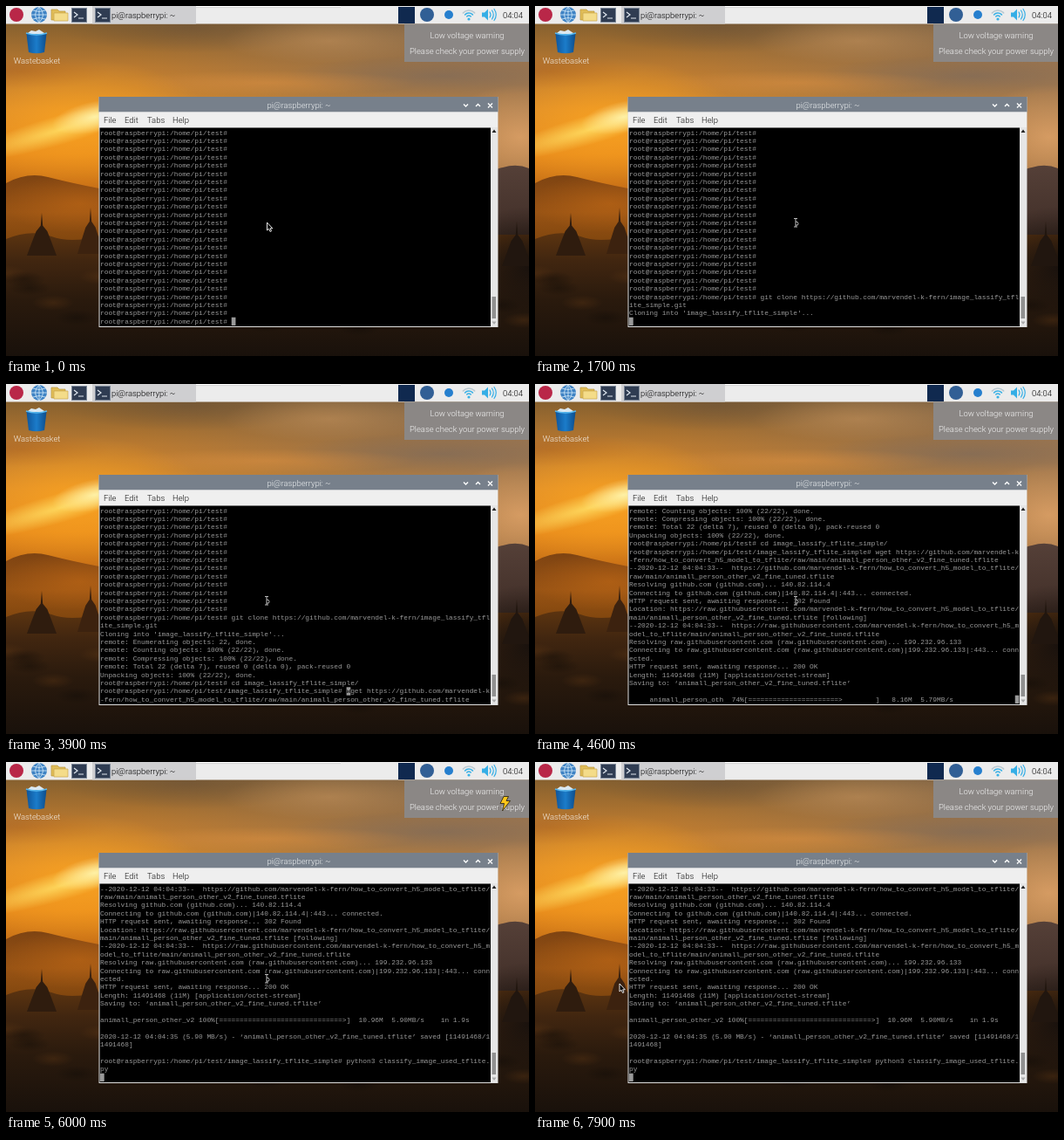
An HTML page with a canvas for the animation above (8 s loop, 600 px wide and 401 px high).

```html
<!DOCTYPE html>
<html lang="en">
<head>
<meta charset="utf-8">
<title>Terminal session</title>
<style>
html, body { margin: 0; width: 100%; height: 100%; overflow: hidden; background: #17120d; }
canvas { display: block; }
</style>
</head>
<body>
<canvas id="stage" width="600" height="401"></canvas>
<script>
const LOOP = 8000, COLS = 95, ROWS = 24;
const CELL = 4.71, ROW = 9.4, TERM_X = 108, TERM_Y = 140.5;
const UI = '300 9.45px Roboto, "Open Sans", sans-serif';
const MONO = '7.85px "Liberation Mono", monospace';
const INK = '#999';
const stage = document.getElementById('stage');
let c = stage.getContext('2d');

// ---------- drawing helpers ----------
function rect(x, y, w, h, fill) {
  c.fillStyle = fill;
  c.fillRect(x, y, w, h);
}
function disc(x, y, r, fill, ry = r) {
  c.fillStyle = fill;
  c.beginPath();
  c.ellipse(x, y, r, ry, 0, 0, 7);
  c.fill();
}
function shape(d, fill, stroke, width = 1) {
  const p = new Path2D(d);
  if (fill) { c.fillStyle = fill; c.fill(p); }
  if (stroke) { c.strokeStyle = stroke; c.lineWidth = width; c.stroke(p); }
}
function label(s, x, y, fill, align = 'left') {
  c.font = UI;
  c.textAlign = align;
  c.fillStyle = fill;
  c.fillText(s, x, y);
}
function at(x, y, draw) {
  c.save();
  c.translate(x, y);
  draw();
  c.restore();
}
function ramp(x0, y0, x1, y1, stops) {
  const g = c.createLinearGradient(x0, y0, x1, y1);
  stops.forEach(([p, col]) => g.addColorStop(p, col));
  return g;
}
// Soft elliptical patch; rgb is "r,g,b"
function glow(x, y, rx, ry, rgb, alpha, turn = 0) {
  at(x, y, () => {
    c.rotate(turn);
    c.scale(rx, ry);
    const g = c.createRadialGradient(0, 0, 0, 0, 0, 1);
    g.addColorStop(0, `rgba(${rgb},${alpha})`);
    g.addColorStop(.5, `rgba(${rgb},${alpha * .5})`);
    g.addColorStop(1, `rgba(${rgb},0)`);
    rect(-1, -1, 2, 2, g);
  });
}

// ---------- desktop ----------
function stupa(x, top, base, half, fill) {
  const h = base - top;
  shape(`M${x} ${top}l1.2 ${h * .3}l${half * .3} ${h * .13}l${half * .25} ${h * .22}L${x + half} ${base}
    H${x - half}L${x - half * .55 - 1.2} ${top + h * .65}l${half * .25} ${-h * .22}l${half * .3} ${-h * .13}Z`, fill);
}
function wallpaper() {
  rect(0, 0, 600, 401, ramp(0, 20, 0, 270, [
    [0, '#86602f'], [.2, '#b97930'], [.4, '#db8c2c'], [.6, '#e4881d'], [.75, '#c67016'], [1, '#8c4c18']]));
  rect(0, 0, 600, 401, ramp(150, 0, 600, 0, [
    [0, 'rgba(130,108,88,0)'], [.6, 'rgba(134,110,88,.5)'], [1, 'rgba(146,116,90,.72)']]));
  glow(210, 24, 150, 30, '108,82,54', .65);
  glow(370, 40, 120, 26, '196,146,92', .55);
  glow(500, 80, 180, 24, '120,104,92', .6);
  glow(300, 88, 170, 14, '220,144,66', .5);
  glow(20, 75, 100, 20, '172,100,34', .6);
  glow(590, 150, 90, 60, '228,166,106', .75);
  glow(85, 135, 150, 75, '255,166,30', .8);
  glow(62, 142, 115, 17, '255,222,100', .85, -.28);
  glow(102, 127, 50, 18, '255,243,170', .95, -.2);
  shape('M0 203Q24 190 48 196Q80 204 107 209L300 230V300H0Z',
    ramp(0, 192, 0, 290, [[0, '#7d4312'], [.45, '#985314'], [.75, '#84480f'], [1, '#59320f']]));
  shape('M480 240Q550 188 570 185Q586 180 600 186V310H480Z',
    ramp(0, 182, 0, 300, [[0, '#554038'], [.5, '#46332c'], [1, '#2a1c15']]));
  glow(85, 226, 90, 34, '214,116,22', .4);
  shape('M0 267Q28 255 52 264T112 262L600 262V401H0Z',
    ramp(0, 255, 0, 401, [[0, '#603610'], [.25, '#412610'], [.55, '#2a1a0d'], [1, '#19110b']]));
  glow(600, 300, 90, 70, '22,16,13', .9);
  stupa(41, 237, 286, 17, '#2f1c0e');
  stupa(97, 231, 284, 15, '#3c220f');
  stupa(586, 247, 298, 17, '#21160f');
  for (let i = 0; i < 24; i++) {
    const x = i * 27 % 600;
    glow(x, 306 + i * 17 % 64, 24, 9, i % 2 ? '14,10,6' : '92,54,20', .4);
  }
}
function terminalIcon(x) {
  rect(x, 2, 18, 17, '#7c8797');
  rect(x + 1, 3, 16, 15, '#2f3c52');
  shape(`M${x + 3} 7l4 3l-4 3M${x + 8} 14h6`, null, '#dfe6ee', 1.2);
}
function panel() {
  rect(0, 0, 600, 20.5, '#ececec');
  rect(99, 0, 119, 20.5, '#cfcfd1');
  rect(218, 0, 166, 1.5, '#fff');
  rect(218, 1.5, 166, .6, '#b9b9b9');
  disc(12, 10, 8, '#b92748');
  disc(38, 10, 9, '#3f83c4');
  shape('M29 10H47M38 1V19M31 5Q38 8 45 5M31 15Q38 12 45 15M38 1Q29 10 38 19Q47 10 38 1', null, '#c8e2f5', .9);
  shape('M52 4h7l2 2h7v10H52Z', '#e0bd58', '#b9963a', .7);
  shape('M55 8h16v9H55Z', '#f4dc89', '#c9a54b', .7);
  terminalIcon(75);
  terminalIcon(102);
  label('pi@raspberrypi: ~', 121, 13.6, '#000');
  rect(450, 1, 19, 19, '#10294f');
  disc(483, 10, 8, '#315f95');
  disc(508, 10, 5, '#267fce');
  c.lineCap = 'round';
  [[9, '#b9c8d0'], [6, '#3ab1e6'], [3, '#3ab1e6']].forEach(([r, col]) => {
    c.beginPath();
    c.arc(531, 14, r, -2.4, -.74);
    c.strokeStyle = col;
    c.lineWidth = 1.6;
    c.stroke();
  });
  disc(531, 15, 1.6, '#3ab1e6');
  shape('M546 7.5h3l4-4v13l-4-4h-3Z', '#35aee6');
  shape('M555 7q2 3 0 6M557.5 5q3.5 5 0 10M560 3.5q4.5 6.5 0 13', null, '#35aee6', 1.2);
  c.lineCap = 'butt';
  label('04:04', 570, 13.6, '#000');
}
function wastebasket() {
  shape('M25 31l4-3l5 1l4-2l6 4v4H25Z', '#dbe8f1');
  shape('M23.5 32H46.5L44 53Q35 55.5 26 53Z', ramp(24, 0, 46, 0, [[0, '#0f569c'], [.5, '#1b7cca'], [1, '#0e4f8e']]));
  shape('M23 31Q35 35 47 31', null, '#58b8ee', 1.6);
  label('Wastebasket', 35.5, 66, '#f3eee6', 'center');
}
function notice() {
  rect(457, 20.5, 143, 43.5, 'rgba(139,137,136,.96)');
  label('Low voltage warning', 529, 36.5, '#f4f4f4', 'center');
  label('Please check your power supply', 529, 55.3, '#f4f4f4', 'center');
}
function windowFrame() {
  rect(106.5, 104, 458, 264, '#dedede');
  rect(106.5, 104, 458, 17.5, '#77808b');
  label('pi@raspberrypi: ~', 336, 117, '#eceef0', 'center');
  shape('M525 112.5l2.5 2.5l2.5-2.5M539 115l2.5-2.5l2.5 2.5M553 111.5l5 5M558 111.5l-5 5', null, '#fff', 1.4);
  rect(107, 121.5, 457, 18, '#efefef');
  [['File', 112], ['Edit', 136], ['Tabs', 162], ['Help', 191]].forEach(([s, x]) => label(s, x, 134, '#111'));
  rect(107.5, 139.5, 448.5, 227.5, '#000');
  rect(556, 139.5, 8, 227.5, '#e6e6e6');
  rect(557.5, 333, 4.5, 25, '#919191');
  shape('M557.5 145h5l-2.5-3.5Z', '#222');
  shape('M557.5 361.5h5l-2.5 3.5Z', '#a8a8a8');
}

// ---------- terminal session ----------
const HOME = 'root@raspberrypi:/home/pi/test# ';
const REPO = 'root@raspberrypi:/home/pi/test/image_lassify_tflite_simple# ';
const USER = 'marvendel-k-fern';
const PROJECT = USER + '/how_to_convert_h5_model_to_tflite/';
const FILE = 'animall_person_other_v2_fine_tuned.tflite';
const PAGE = `https://github.com/${PROJECT}raw/main/${FILE}`;
const RAW = `https://raw.githubusercontent.com/${PROJECT}main/${FILE}`;
const GET_START = 4300, GET_END = 4700;

function progress(t) {
  const p = Math.min(1, .74 * (t - GET_START) / (4600 - GET_START));
  if (t >= GET_END) {
    return `animall_person_other_v2 100%[${'='.repeat(30)}>]  10.96M  5.90MB/s    in 1.9s`;
  }
  const fill = Math.round(31 * p);
  const bar = fill ? '='.repeat(fill - 1) + '>' : '';
  const size = (p === .74 ? 8.16 : 10.96 * p).toFixed(2) + 'M';
  const percent = (Math.floor(p * 100 + .01) + '%').padStart(5);
  return `     animall_person_oth${percent}[${bar.padEnd(31)}]${size.padStart(8)}  5.79MB/s`.padEnd(COLS - 1);
}

// Each step adds its text to the log from its time on
const session = [
  [0, (HOME + '\n').repeat(ROWS - 1) + HOME],
  [700, `git clone https://github.com/${USER}/image_lassify_tflite_simple.git`],
  [1300, "\nCloning into 'image_lassify_tflite_simple'...\n"],
  [1900, 'remote: Enumerating objects: 22, done.\nremote: Counting objects: 100% (22/22), done.\n'
    + 'remote: Compressing objects: 100% (22/22), done.\n'],
  [2000, 'remote: Total 22 (delta 7), reused 0 (delta 0), pack-reused 0\n'
    + 'Unpacking objects: 100% (22/22), done.\n' + HOME],
  [2300, 'cd '],
  [2400, 'im'],
  [2500, 'age_lassify_tflite_simple/'],
  [3000, '\n' + REPO],
  [3500, 'wget ' + PAGE],
  [4100, `\n--2020-12-12 04:04:33--  ${PAGE}\nResolving github.com (github.com)... 140.82.114.4\n`
    + 'Connecting to github.com (github.com)|140.82.114.4|:443... connected.\n'],
  [4200, `HTTP request sent, awaiting response... 302 Found\nLocation: ${RAW} [following]\n`
    + `--2020-12-12 04:04:33--  ${RAW}\n`
    + 'Resolving raw.githubusercontent.com (raw.githubusercontent.com)... 199.232.96.133\n'
    + 'Connecting to raw.githubusercontent.com (raw.githubusercontent.com)|199.232.96.133|:443... connected.\n'],
  [GET_START, 'HTTP request sent, awaiting response... 200 OK\n'
    + `Length: 11491468 (11M) [application/octet-stream]\nSaving to: ‘${FILE}’\n\n`],
  [GET_START, progress],
  [GET_END, `\n\n2020-12-12 04:04:35 (5.90 MB/s) - ‘${FILE}’ saved [11491468/11491468]\n\n${REPO}`],
  [5200, 'python3 '],
  [5300, 'cl'],
  [5400, 'assify_image_used_tflite.py'],
  [5700, '\n']
];

function terminal(t) {
  let log = '';
  for (const [start, text] of session) {
    if (t >= start) log += typeof text === 'function' ? text(t) : text;
  }
  const rows = log.split('\n').flatMap(s => s.match(/.{1,95}/g) || ['']).slice(-ROWS);
  let row = rows.length - 1, col = rows[row].length;
  // The recalled download command is shown with the caret at its start
  if (t >= 3500 && t < 4100) { row--; col = REPO.length; }

  c.font = MONO;
  c.textAlign = 'left';
  c.fillStyle = INK;
  rows.forEach((s, i) => c.fillText(s, TERM_X, TERM_Y + i * ROW + 7));
  const x = TERM_X + col * CELL, y = TERM_Y + row * ROW;
  rect(x, y, CELL, ROW, INK);
  c.fillStyle = '#000';
  c.fillText(rows[row][col] || '', x, y + 7);
}

// ---------- moving details ----------
function pointer(t) {
  const p = Math.max(0, Math.min(1, (t - 7000) / 700));
  const e = p * p * (3 - 2 * p);
  const x = 299.5 - 202.5 * e, y = 248 + 6 * e;
  at(x, y, () => {
    if (t < 500 || x < 107) {
      shape('M0 0V9L2 7.2L3.6 10.5L5 9.8L3.6 6.8H6.3Z', '#000', '#fff', .9);
    } else {
      const beam = 'M-2.5-4.5H1.5M-.5-4.5V5M-2.5 5H1.5M-.5-1Q2.5-1 2.5 1.5T-.5 3';
      shape(beam, null, '#000', 2.6);
      shape(beam, null, '#ccc', .9);
    }
  });
}
function bolt() {
  shape('M571 39.5h5.5l-2.5 5h4.5l-9 11.5l2-8.5h-4.5Z', '#ffc61a', '#332a14', .9);
}

const desktop = document.createElement('canvas');
desktop.width = 600;
desktop.height = 401;
const screen2d = c;
c = desktop.getContext('2d');
wallpaper();
c = screen2d;

function frame(now) {
  const t = Math.floor(now % LOOP / 100) * 100;
  c.drawImage(desktop, 0, 0);
  panel();
  wastebasket();
  notice();
  windowFrame();
  terminal(t);
  if (t >= 5800 && t < 6300) bolt();
  pointer(t);
  requestAnimationFrame(frame);
}
requestAnimationFrame(frame);
</script>
</body>
</html>
```
